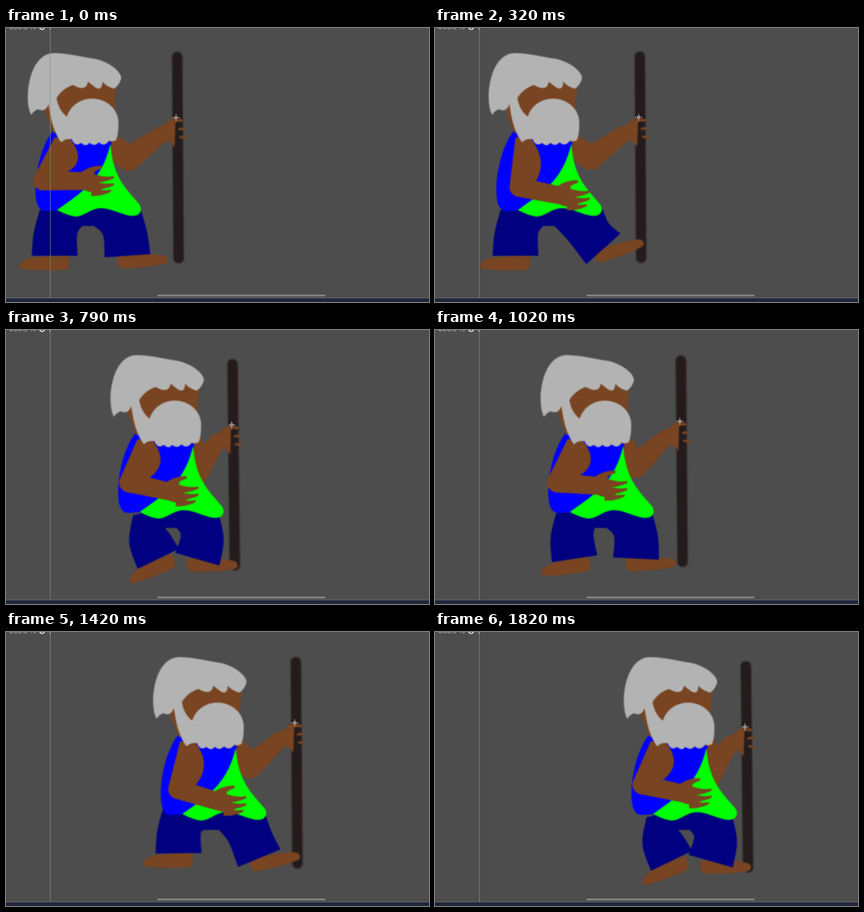
Write an HTML page that moves like this. It is 903 px wide and 587 px high and loops after 1.89 s.

```html
<!DOCTYPE html>
<html lang="en">
<head>
<meta charset="utf-8">
<title>Walking old man</title>
<style>
  html, body { margin: 0; width: 100%; height: 100%; overflow: hidden; background: #4d4d4d; }
  svg { display: block; width: 903px; height: 587px; }
  .soft { filter: blur(.9px); }
  .skin { fill: #784421; }
  .hair { fill: #b3b3b3; }
  .vest { fill: #00f; }
  .robe { fill: #0f0; }
  .pants { fill: #000080; }
  .line { fill: none; stroke-linecap: round; }
  .zoom { font: 14.5px Inter, "Open Sans", sans-serif; fill: #b4b4b4; }
</style>
</head>
<body>
<svg viewBox="0 0 903 587">
  <defs>
    <path id="finger" d="M188 313Q212 321 229 317.500Q238 322 206 330L188 331Z"/>
  </defs>
  <rect width="903" height="587" fill="#4d4d4d"/>

  <g id="man">
    <g class="soft">
      <g class="grip line">
        <path d="M365.500 62L368.500 493" stroke="#393031" stroke-width="24"/>
        <path d="M365.500 62L368.500 493" stroke="#241c1c" stroke-width="20"/>
      </g>
      <path id="farArm" class="skin"/>
      <g class="grip">
        <path class="skin" d="M322 213Q334 213 345 201Q352 194 362 193L360 255Q352 245 342 241Z"/>
        <g class="line" stroke="#784421">
          <path d="M359 200Q366 196 374 198.500" stroke-width="6.500"/>
          <path d="M370 217Q376 214 380 217.500M372 234Q378 233 382 236.500" stroke-width="5"/>
        </g>
      </g>

      <path id="rearFoot" class="skin" d="M28 511Q32 496 60 491Q100 488 134 488Q138 505 130 518Q80 522 32 516Z"/>
      <path id="frontFoot" class="skin" d="M238 494Q236 508 245 515Q310 513 342 504Q350 498 342 489Q320 481 238 488Z"/>
      <g class="pants">
        <path id="rearLeg"/>
        <path id="frontLeg"/>
        <path d="M95 378L145 424H186L280 395V375Z"/>
      </g>

      <path class="vest" d="M100 221C76 250 62 310 63 350Q63 392 85 392L112 390L200 340L226 245L130 215Z"/>
      <path class="robe" d="M223 248C228 320 256 344 284 377Q294 392 280 401C258 408 230 386 203 386C180 386 168 404 148 404Q132 402 109 390C165 350 205 325 223 248Z"/>
      <path id="nearArm" class="skin"/>
      <g id="nearHand" class="skin">
        <path d="M160 309Q182 294 203 295Q211 299 198 303Q187 307 189 314L206 345Q190 358 164 346Z"/>
        <use href="#finger"/>
        <use href="#finger" y="15"/>
        <use href="#finger" x="-6" y="29"/>
      </g>

      <path class="skin" d="M82 175L120 115L236 118L231 180L235 200L130 205L102 226Z"/>
      <path class="hair" d="M54 186C38 160 46 60 98 54C125 52 160 62 190 66C225 74 247 96 246 108Q242 122 231 130Q215 126 206 115Q205 136 190 127L175 115Q171 138 143 122Q120 130 108 150Q112 176 130 190A56 52 0 0 1 240 207Q240 228 235 240q-7 5-15 1q-9 15-22 4q-9 10-20 1q-7 10-18 0q-12 10-20-8h-8Q125 238 118 245C103 225 96 200 91 163Q84 182 68 174Q60 177 54 186Z"/>
    </g>
    <g class="grip line" stroke="#b0a8a4">
      <path d="M363 184v4M363 196v4M355 192h4M367 192h4" stroke-width="1.300" stroke-linecap="butt"/>
      <circle cx="363" cy="192" r="3.200" fill="#8f8784"/>
    </g>
  </g>

  <path d="M94.500 0V578" stroke="#7a9c7c"/>
  <rect x="323" y="571" width="359" height="4" rx="2" fill="#828282"/>
  <rect y="579" width="903" height="8" fill="#20273a"/>
  <path d="M0 578.500H903" stroke="#73748a"/>
  <text class="zoom" x="7" y="3">300.5 %</text>
  <circle cx="77" cy="-2" r="6.500" fill="#d8d8d8"/>
  <path d="M74 0h6l-3 3z" fill="#4d4d4d"/>
  <circle cx="94" cy="2" r="1.200" fill="#d8d8d8"/>
</svg>

<script>
const LOOP = 1890, CYCLE = 13, STRIDE = 180;
const $ = id => document.getElementById(id);

// reach: far arm from stretched (0) to drawn in (1); elbow and hand: near arm;
// legs: knee x, knee y, shin angle, foot angle
const stand = { reach: [0], elbow: [79, 327], hand: [0, 0], front: [256, 438, -4, 0], rear: [104, 438, 0, 0] };
const step = { ...stand, reach: [-.06], elbow: [112, 341], hand: [32, 31], front: [263, 431, -46, -29] };
const lower = { ...step, front: [258, 436, -42, -15] };
const plant = { reach: [1], elbow: [75, 329], hand: [-19, 41], front: [246, 443, 16, 3], rear: [97, 401, -5, 0] };
const lift = { ...plant, reach: [.81], rear: [93, 396, -2, 0] };
const pass = { ...plant, reach: [.94], elbow: [86, 327], hand: [4, 18], rear: [127, 445, -26, -22] };

const walk = [
  [0, { x: [0], ...stand }],
  [3, { x: [54.5], ...step }],
  [4, { x: [68], ...lower }],
  [7, { x: [126.5], ...lift }],
  [8, { x: [140.5], ...plant }],
  [10, { x: [176.5], ...pass }],
  [CYCLE, { x: [STRIDE], ...stand }]
];

const mix = (a, b, t) => a.map((v, i) => v + (b[i] - v) * t);
const add = (p, q, k = 1) => [p[0] + q[0] * k, p[1] + q[1] * k];
const unit = (a, b) => {
  const d = add(b, a, -1), len = Math.hypot(...d);
  return [d[0] / len, d[1] / len];
};
const turn = ([x, y], deg) => {
  const r = deg * Math.PI / 180, c = Math.cos(r), s = Math.sin(r);
  return [x * c - y * s, x * s + y * c];
};
const move = (el, [x, y], deg = 0, [cx, cy] = [0, 0]) =>
  el.setAttribute('transform', `translate(${x} ${y}) rotate(${deg} ${cx} ${cy})`);

function sample(phase) {
  const i = walk.findIndex(k => k[0] > phase);
  const [p, a] = walk[i - 1], [q, b] = walk[i];
  const at = {};
  for (const key in a) at[key] = mix(a[key], b[key], (phase - p) / (q - p));
  return at;
}

// Tapered limb with round ends
function limb(a, ra, b, rb) {
  const [dx, dy] = unit(a, b), n = [-dy, dx];
  return `M${add(a, n, ra)}L${add(b, n, rb)}A${rb} ${rb} 0 0 0 ${add(b, n, -rb)}` +
    `L${add(a, n, -ra)}A${ra} ${ra} 0 0 0 ${add(a, n, ra)}Z`;
}

function drawFarArm(reach) {
  const elbow = mix([262, 280], [224, 314], reach);
  const wrist = add([332, 227], [-61.5, 12], reach);
  $('farArm').setAttribute('d', limb([222, 250], 25, elbow, 26) + limb(elbow, 26, wrist, 17));
}

// The crook lies where the upper arm's inner side meets the forearm's top.
function drawNearArm(elbow, hand) {
  const wrist = add([168, 328], hand);
  const up = unit(elbow, [122, 263]), fore = unit(elbow, wrist);
  const cos = up[0] * fore[0] + up[1] * fore[1];
  const along = (34 + 21 * cos) / Math.sqrt(1 - cos * cos);
  const crook = add(add(elbow, fore, along), [fore[1], -fore[0]], 21);
  const back = add(elbow, [up[1], -up[0]], 21);
  $('nearArm').setAttribute('d', limb(elbow, 21, wrist, 19) +
    `M104 234L${back}L${elbow}L${crook}Q173 284 136 236Z`);
  move($('nearHand'), hand);
}

const ankle = ([kx, ky, shin]) => add([kx, ky], turn([0, 50], shin));

function drawLeg(name, side, leg, crotch) {
  const [kx, ky, shin, tilt] = leg, knee = [kx, ky];
  const kneeAt = s => add(knee, turn([46 * s, 0], shin / 2));
  const cuffAt = s => add(knee, turn([49 * s, 50], shin));
  const kneeIn = kneeAt(-side), kneeOut = kneeAt(side);
  $(name + 'Leg').setAttribute('d', `M${crotch}C${kneeIn} ${kneeIn} ${cuffAt(-side)}` +
    `L${cuffAt(side)}C${kneeOut} ${kneeOut} ${add(knee, [32 * side, -48])}L170 380Z`);
  const rest = ankle(stand[name]);
  move($(name + 'Foot'), add(ankle(leg), rest, -1), tilt, rest);
}

function pose(n) {
  const { x, reach: [reach], elbow, hand, front, rear } = sample(n % CYCLE);
  move($('man'), [x[0] + STRIDE * Math.floor(n / CYCLE), 0]);
  for (const el of document.querySelectorAll('.grip')) {
    move(el, [-61.5 * reach, 12 * reach], -.25 * reach, [365, 192]);
  }
  drawFarArm(reach);
  drawNearArm(elbow, hand);
  drawLeg('rear', -1, rear, [163, 424]);
  drawLeg('front', 1, front, [186, 423]);
}

// Steps last 80 ms, with a few of 70 ms.
const stepAt = t => Math.floor((t + (t >= 390) * 10 + (t >= 1180) * 10) / 80);

const start = performance.now();
let shown = -1;
function frame() {
  const n = stepAt((performance.now() - start) % LOOP);
  if (n !== shown) pose(shown = n);
  requestAnimationFrame(frame);
}
frame();
</script>
</body>
</html>
```
